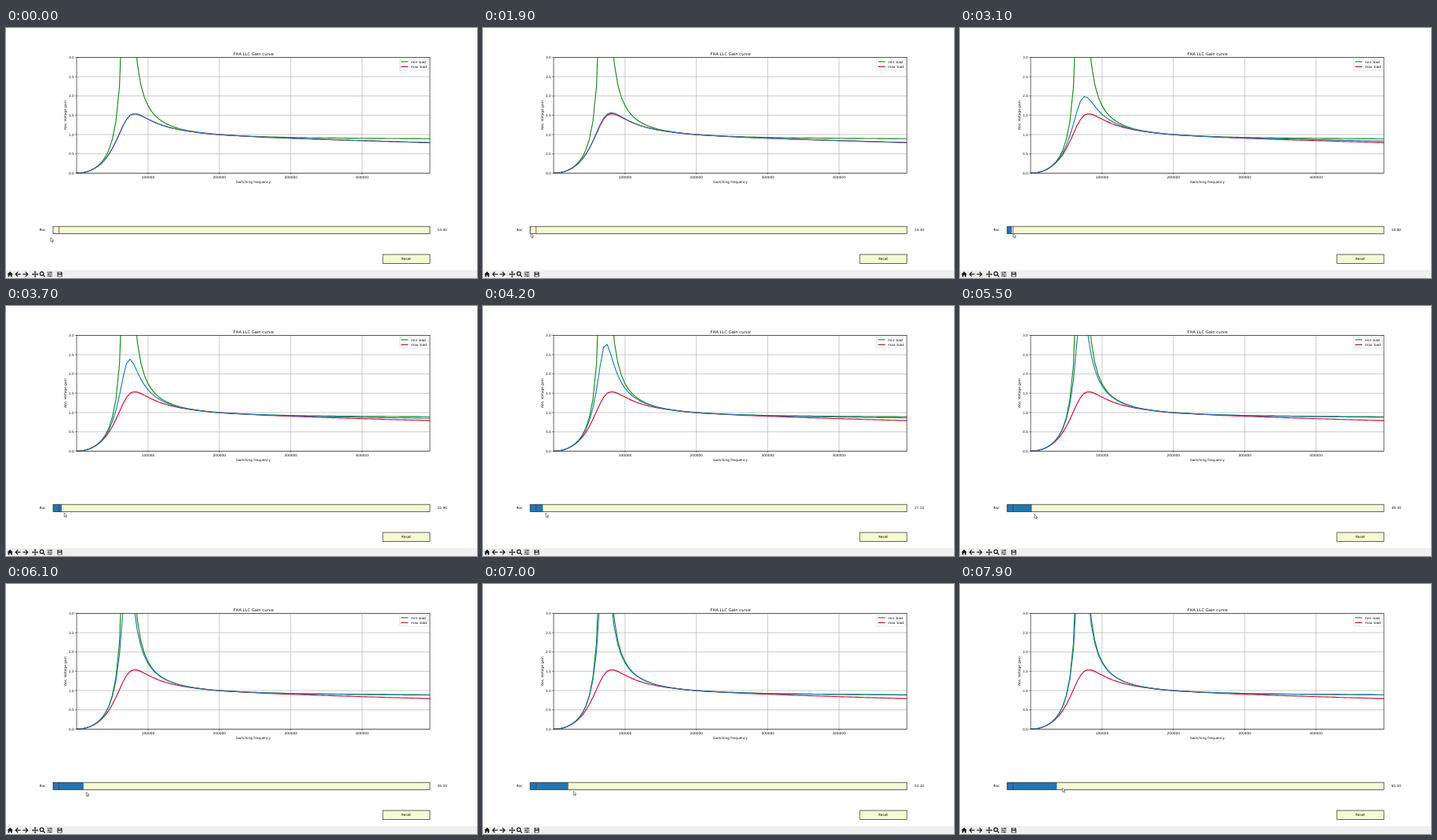
An HTML page that plays this animation: 600 by 319 pixels, repeating every 8 s.

```html
<!DOCTYPE html>
<html lang="en">
<head>
<meta charset="utf-8">
<title>Gain curve</title>
<style>
html, body { margin: 0; width: 100%; height: 100%; overflow: hidden; background: #fff; }
svg { display: block; width: 600px; height: 319px; }
text { font: 4.34px "DejaVu Sans", sans-serif; text-rendering: geometricPrecision; fill: #111; }
.title { font-size: 5.21px; }
.mid { text-anchor: middle; }
.end { text-anchor: end; }
.edge { fill: none; stroke: #222; stroke-width: .7; }
.grid { fill: none; stroke: #b4b4b4; stroke-width: .7; }
.curve { fill: none; stroke-width: 1.15; stroke-linejoin: round; }
.icon { fill: none; stroke: #1a1a1a; stroke-width: 1.2; }
</style>
</head>
<body>
<svg viewBox="0 0 600 319">
  <clipPath id="clip"><rect x="90" y="37.5" width="450" height="147.8"/></clipPath>
  <path id="grid" class="grid"/>
  <g id="curves" clip-path="url(#clip)"></g>
  <path id="ticks" class="edge"/>
  <rect class="edge" x="90" y="37.5" width="450" height="147.7"/>
  <g id="labels"></g>
  <text class="title mid" x="315.2" y="34.6">FHA LLC Gain curve</text>
  <text class="mid" x="315" y="197.7">Switching frequency</text>
  <text class="mid" transform="translate(77.2 111.2) rotate(-90)">Abs. Voltage gain</text>

  <rect x="501.6" y="39.4" width="36.6" height="14.6" rx=".9" fill="#fff" stroke="#ccc" stroke-width=".5"/>
  <path class="curve" stroke="#168a16" d="M503.3 43h9"/>
  <path class="curve" stroke="#cc0c33" d="M503.3 49.4h9"/>
  <text x="516" y="44.5">min load</text>
  <text x="516" y="50.9">max load</text>

  <rect x="60" y="253.2" width="480" height="9.3" fill="#f6fad3"/>
  <rect id="fill" x="60" y="253.2" height="9.3" fill="#1f77b4"/>
  <path d="M67.5 253.2v9.3" stroke="#8a1c2c" stroke-width=".7"/>
  <rect class="edge" x="60" y="253.2" width="480" height="9.3"/>
  <text class="end" x="50.4" y="259.3">Rac</text>
  <text id="value" x="549.5" y="259.3"></text>
  <rect class="edge" x="480" y="289" width="60" height="11.6" style="fill:#f6fad3"/>
  <text class="mid" x="510" y="296.3">Reset</text>

  <rect y="309" width="600" height="10" fill="#f0f0f0"/>
  <path d="M1.6 314.3L5.2 310.8l3.6 3.5h-1v3.1H6v-2H4.4v2H2.6v-3.1z" fill="#1a1a1a"/>
  <path class="icon" d="M18.6 314.2H12.4M15.2 311.2l-3 3 3 3M21.4 314.2h6.2M24.8 311.2l3 3-3 3"/>
  <path class="icon" style="stroke-width:1" d="M33.8 314.2h6.6M37.1 310.9v6.6"/>
  <path d="M33 314.2l1.6-1.5v3zM41.2 314.2l-1.6-1.5v3zM37.1 310.1l-1.5 1.6h3zM37.1 318.3l-1.5-1.6h3z" fill="#1a1a1a"/>
  <circle class="icon" cx="45.6" cy="313.4" r="2.3"/>
  <path class="icon" d="M47.3 315.1l2.4 2.4"/>
  <path class="icon" style="stroke-width:.8" d="M52.4 311.8h6.8M52.4 314.2h6.8M52.4 316.6h6.8M57 310.8v2M54.3 313.2v2M56.4 315.6v2"/>
  <path d="M31 310.5v7.5M62.3 310.5v7.5" stroke="#ddd" stroke-width=".5"/>
  <path d="M65.3 311h5.4l.9.9v5.7h-6.3z" fill="#333"/>
  <path d="M66.7 311.5h3.2v1.8h-3.2zM66.5 314.7h3.9v2.3h-3.9z" fill="#ddd"/>

  <path id="cursor" d="M0 0V5.2L1.2 4.1 2.1 6.1 3 5.7 2.1 3.8H3.7z" fill="#fff" stroke="#333" stroke-width=".55"/>
</svg>
<script>
const $ = id => document.getElementById(id);
const px = f => 90 + f / 1100;
const py = gain => 185.2 - gain * 49.23;

// First-harmonic LLC gain: 200 kHz resonance, inductance ratio 8, Q = 4 / Rac
function gain(f, rac) {
  const x = (f / 200000) ** 2, q = 4 / rac;
  return 7 * x / Math.hypot(8 * x - 1, 7 * q * Math.sqrt(x) * (x - 1));
}

function curvePath(rac) {
  const pts = [];
  for (let f = 0; f <= 495000; f += 5000)
    pts.push(px(f).toFixed(2) + ' ' + py(gain(f, rac)).toFixed(2));
  return 'M' + pts.join('L');
}

function add(parent, tag, attrs, text = '') {
  const el = document.createElementNS('http://www.w3.org/2000/svg', tag);
  for (const k in attrs) el.setAttribute(k, attrs[k]);
  el.textContent = text;
  return $(parent).appendChild(el);
}

const addCurve = (stroke, rac) =>
  add('curves', 'path', { class: 'curve', stroke, d: curvePath(rac) });

let grid = '', ticks = '';
for (let f = 100000; f <= 400000; f += 100000) {
  grid += `M${px(f)} 37.5V185.2`;
  ticks += `M${px(f)} 185.2v1.6`;
  add('labels', 'text', { class: 'mid', x: px(f), y: 191.7 }, f);
}
for (let g = 0; g <= 3; g += .5) {
  grid += `M90 ${py(g)}H540`;
  ticks += `M90 ${py(g)}h-1.6`;
  add('labels', 'text', { class: 'end', x: 86.8, y: py(g) + 1.6 }, g.toFixed(1));
}
$('grid').setAttribute('d', grid);
$('ticks').setAttribute('d', ticks);

addCurve('#168a16', 400);
addCurve('#cc0c33', 14);
const live = addCurve('#1f77b4', 14);

// time, Rac, cursor x, cursor y
const keys = [
  [0, 14, 56.9, 267.3], [600, 14, 60.9, 262], [1100, 14, 60.9, 262],
  [1400, 14.3, 60.9, 262], [1900, 14.3, 60.9, 262], [2700, 15.2, 64, 262],
  [3100, 18.8, 67.7, 262], [3600, 22, 73, 263.8], [4200, 27.1, 80, 264.2],
  [4900, 34.4, 88.1, 265.3], [5400, 38.3, 93.6, 265.8], [6100, 45.2, 102.2, 265.3],
  [7200, 55, 118, 264], [7900, 65, 130.4, 260.2], [8000, 65, 130.4, 260.2]
];

function poseAt(t) {
  const i = keys.findIndex(k => k[0] > t), a = keys[i - 1], b = keys[i];
  const u = (t - a[0]) / (b[0] - a[0]);
  return a.map((v, j) => v + (b[j] - v) * u);
}

function draw(now) {
  const t = Math.floor(now % 8000 / 100) * 100;
  const [, r, x, y] = poseAt(t);
  const rac = Math.round(r * 10) / 10;
  live.setAttribute('d', curvePath(rac));
  $('fill').setAttribute('width', (rac - 14) * 480 / 386);
  $('value').textContent = rac.toFixed(2);
  $('cursor').setAttribute('transform', `translate(${x} ${y})`);
}

const start = performance.now();
function tick() {
  draw(performance.now() - start);
  requestAnimationFrame(tick);
}
tick();
</script>
</body>
</html>
```
